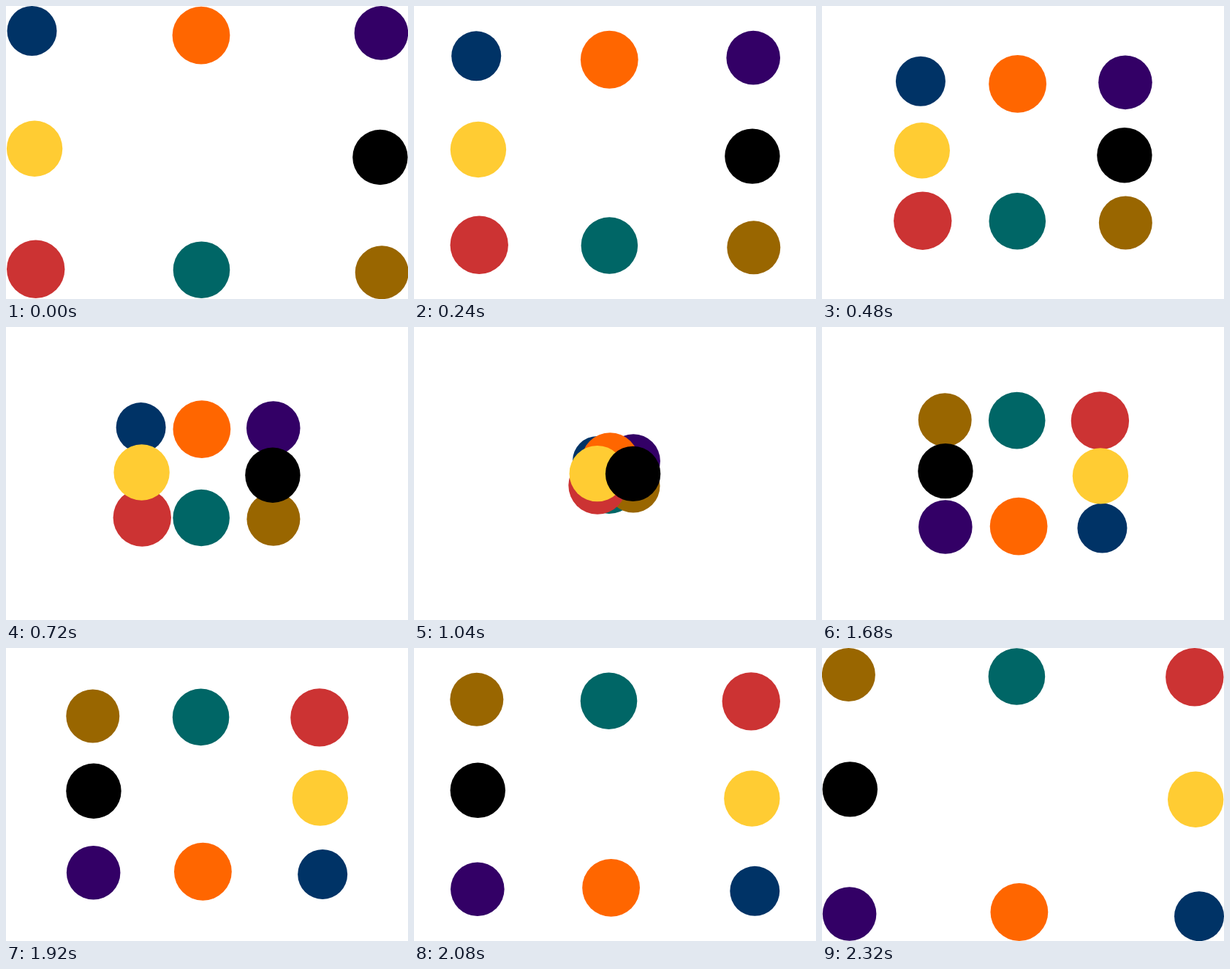
An HTML page with a canvas that plays this animation: 550x400 px, repeating every 2.4 s.

```html
<!DOCTYPE html>
<html lang="en">
<head>
<meta charset="utf-8">
<title>Crossing discs</title>
<style>
  html, body { margin: 0; width: 100%; height: 100%; overflow: hidden; background: #fff; }
  canvas { display: block; }
</style>
</head>
<body>
<canvas id="stage" width="550" height="400"></canvas>
<script>
const ctx = document.getElementById('stage').getContext('2d');
const STEP = 80;
const STEPS = 30;

// Back to front: colour, radius, start centre, end centre
const discs = [
  ['#003366', 34, 35.5, 34, 516, 366.2],
  ['#330066', 36.8, 513.4, 36.9, 37.6, 363],
  ['#006666', 38.8, 267.5, 360.2, 266.4, 39],
  ['#996600', 36.5, 514.2, 363.7, 36.4, 36.5],
  ['#cc3333', 39.7, 40.7, 359.3, 509.8, 39.8],
  ['#ff6600', 39.4, 267, 40.1, 269.9, 360.5],
  ['#ffcc33', 38.2, 39.1, 194.8, 511.2, 206.7],
  ['#000000', 37.7, 511.9, 206.5, 38.3, 192.9]
];

const lerp = (a, b, p) => a + (b - a) * p;

function draw(ms) {
  const p = Math.floor(ms / STEP) % STEPS / (STEPS - 1);
  ctx.fillStyle = '#fff';
  ctx.fillRect(0, 0, 550, 400);
  for (const [color, r, x0, y0, x1, y1] of discs) {
    ctx.fillStyle = color;
    ctx.beginPath();
    ctx.arc(lerp(x0, x1, p), lerp(y0, y1, p), r, 0, Math.PI * 2);
    ctx.fill();
  }
}

const start = performance.now();
function tick() {
  draw(performance.now() - start);
  requestAnimationFrame(tick);
}
tick();
</script>
</body>
</html>
```
